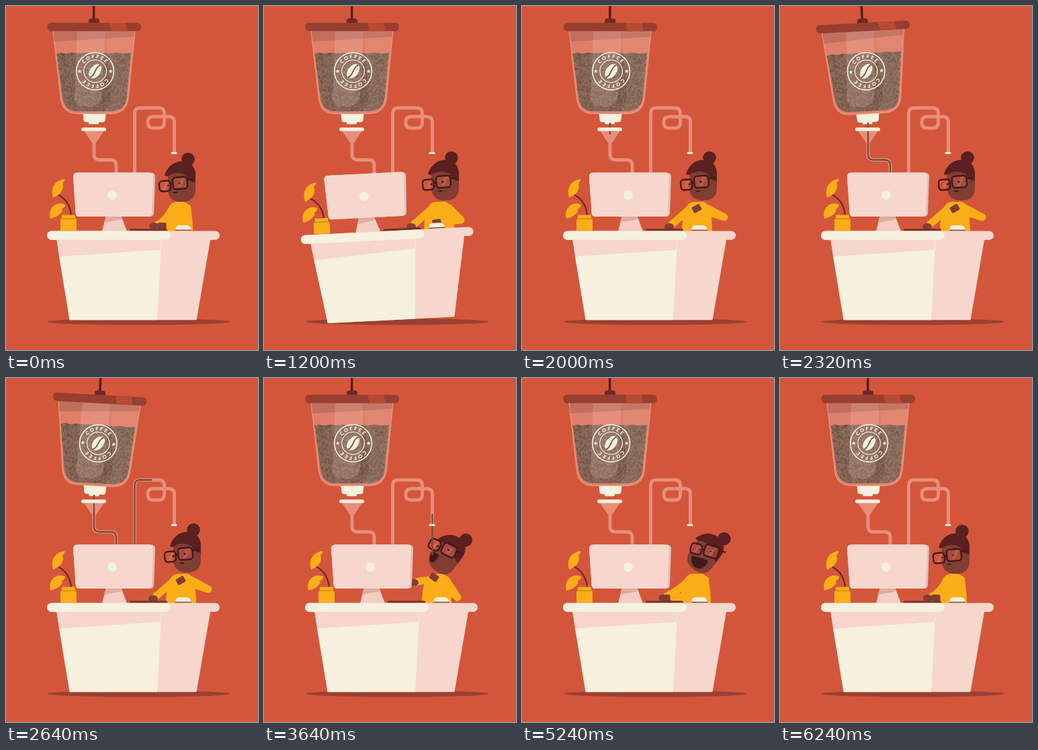
Write an HTML page that moves like this. It is 375 px wide and 513 px high and loops after 6.28 s.

```html
<!DOCTYPE html>
<html lang="en">
<head>
<meta charset="utf-8">
<title>Coffee break</title>
<style>
  html, body { margin: 0; width: 100%; height: 100%; overflow: hidden; background: #d4563a; }
  svg { display: block; width: 375px; height: 513px; }
  .line { fill: none; stroke-linecap: round; stroke-linejoin: round; }
  .cream { fill: #f6f0de; }
  .pink { fill: #f7d6cd; }
  .gold { fill: #fbad18; }
  .hair { fill: #5a2120; }
  .skin { fill: #813e33; }
  .frame { fill: #c655458c; stroke: #421a1b; stroke-width: 2.4; }
  text { font: 900 7.4px Lato, sans-serif; letter-spacing: 1.9px; text-anchor: middle; fill: #f6f0de; }
</style>
</head>
<body>
<svg viewBox="0 0 375 513">
  <defs>
    <clipPath id="fill"><path d="M75.5 71L82 69.5 90 71 99 69.5 108 70.5 118 69.5 130 71 142 69.5 153 71 164 69.5 175 71 186 70L179.5 136Q177 157 155 157H107Q87 157 84 136Z"/></clipPath>
    <path id="arc" d="M-19.6 0A19.6 19.6 0 0 1 19.6 0"/>
    <path id="star" d="M0-3.2L.9-1 3.1-1 1.4.5 2 2.8 0 1.5-2 2.8-1.4.5-3.1-1-.9-1Z"/>
  </defs>
  <rect width="375" height="513" fill="#d4563a"/>
  <ellipse cx="198" cy="470.8" rx="136" ry="4.8" fill="#9a4032"/>

  <g class="line" stroke="#e58f7b" stroke-width="4.9">
    <path d="M131 200V222Q131 229.5 139 229.5H156Q164 229.5 164 238V256"/>
    <path d="M191.5 256V160Q191.5 152 199.5 152H227Q235.5 152 235.5 160V174Q235.5 182 227 182H219Q211 182 211 174V173Q211 165 219 165H242Q250.5 165 250.5 173V218"/>
  </g>
  <path d="M116 186H146L134 204H128Z" fill="#e58f7b"/>

  <g id="hopper">
    <path d="M130.7-30V20" stroke="#4f1e1d" stroke-width="3.4"/>
    <path d="M70 37H192L182 138Q179 160.5 156 160.5H106Q84 160.5 81.5 138Z" fill="#f6d5cd" fill-opacity=".32" stroke="#eba896" stroke-width="1.4" stroke-opacity=".7"/>
    <path d="M70.5 37H191.5L190.5 46L72 53Z" fill="#7b4a40" opacity=".3"/>
    <g clip-path="url(#fill)">
      <rect x="70" y="66" width="122" height="96" fill="#8a6b5a"/>
      <path id="beans" fill="none" stroke="#6b4f44" stroke-width=".8"/>
    </g>
    <path d="M106 38H148L143 130Q141 150 122 150H117Q102 150 102 135Z" fill="#f9ddd5" opacity=".17"/>
    <path d="M148 38H191L182 138Q179 160 156 160H142Q154 152 156 130Z" fill="#f9ddd5" opacity=".07"/>
    <path d="M123 26V22Q123 18.5 127 18.5H135Q139 18.5 139 22V26Z" fill="#702a24"/>
    <rect x="61.5" y="25" width="139.5" height="12.5" rx="5.5" fill="#973f30"/>
    <path d="M154 25H178L181 37.5H157Z" fill="#b84a32"/>
    <g transform="translate(132.6 97.3)">
      <circle r="27.8" fill="none" stroke="#f6f0de" stroke-width="1.6"/>
      <circle r="16.8" fill="none" stroke="#f6f0de" stroke-width="1.2"/>
      <text><textPath href="#arc" startOffset="50%">COFFEE</textPath></text>
      <text transform="rotate(180)"><textPath href="#arc" startOffset="50%">COFFEE</textPath></text>
      <use href="#star" x="-23" class="cream"/><use href="#star" x="23" class="cream"/>
      <g transform="rotate(36)">
        <ellipse rx="7.8" ry="12" class="cream"/>
        <path d="M1-12C-5-4 5 4-1 12" fill="none" stroke="#6f5248" stroke-width="1.8"/>
      </g>
    </g>
    <path d="M114.5 161H148.5L147.5 170Q147 173.3 143.5 173.3H119.5Q116 173.3 115.5 170Z" class="cream"/>
    <rect x="123" y="172.5" width="15" height="3.7" rx="1.2" class="cream"/>
  </g>

  <g id="person">
    <path id="torso" class="gold"/>
    <path id="armL" class="line" stroke="#fbad18" stroke-width="11"/>
    <path id="armR" class="line" stroke="#fbad18" stroke-width="11"/>
    <rect id="handR" class="skin" x="-6.5" y="-5" width="13" height="10" rx="2"/>
    <ellipse id="handL" class="skin" rx="7" ry="5"/>
    <g id="head">
      <circle cx="9" cy="-36.5" r="9.8" class="hair"/>
      <path d="M-21-18V8Q-21 27 0 27Q20 27 20 8V-18Z" class="skin"/>
      <path d="M-26-13Q-19-32-2-33.5Q20-33 20-12V-2Q10-2 6-13Q-8-19-18-13Q-24-9-26-13Z" class="hair"/>
      <path id="mouth" fill="#42191b"/>
      <g id="glasses">
        <g class="frame">
          <rect x="-34" y="-6.5" width="16.5" height="15.5" rx="4.5"/>
          <rect x="-13.7" y="-10" width="21.5" height="17.5" rx="4.5"/>
          <path d="M-17.5-.5L-13.7-1M7.8-5L18-6"/>
        </g>
        <path d="M-29 7L-24-4H-20L-25 7ZM-7 5L-1-8H4L-2 5Z" fill="#f0a696" opacity=".2"/>
        <ellipse id="eyeL" cx="-21" cy="1" rx="1.6" fill="#42191b"/>
        <ellipse id="eyeR" cx="-4" cy="-1" rx="1.6" fill="#42191b"/>
      </g>
    </g>
  </g>

  <path id="coffee" fill="none" stroke="#7a4a3f" stroke-width="2.3"
    d="M131 174V222Q131 229.5 139 229.5H156Q164 229.5 164 238V270H191.5V160Q191.5 152 199.5 152H227Q235.5 152 235.5 160V174Q235.5 182 227 182H219Q211 182 211 174V173Q211 165 219 165H242Q250.5 165 250.5 173V264"/>
  <rect x="112" y="181.2" width="37" height="5.4" rx="2.7" class="cream"/>
  <rect x="245.5" y="217.8" width="9" height="3" rx="1.5" class="cream"/>

  <g id="desk">
    <path d="M97 314Q96 291 77 281" class="line" stroke="#6f2a24" stroke-width="2.2"/>
    <path d="M70 286C66 270 73 260 87.5 258C88 262 82 264 85 268C85 278 78 282 70 286ZM66 317C62 302 74 290 88 296C88 302 80 302 84 305C80 312 74 315 66 317Z" class="gold"/>
    <rect x="83" y="311.5" width="20" height="7" rx="1.5" class="gold"/>
    <path d="M81 320Q81 317 84 317H102Q105 317 105 320V335H81Z" class="gold"/>
    <path d="M83 317.3H103" stroke="#cf8618" stroke-width="1.4"/>
    <path d="M149 312H171L180 336H143Z" fill="#f4cdc4"/>
    <path d="M149 313H171L173 318L147 323Z" fill="#dfaca1"/>
    <path id="screen" d="M106 248.5H213Q219 248.5 219 254.5L217 309Q216.8 314 211 314H109Q104 314 103.7 309L100 254.5Q100 248.5 106 248.5Z" class="pink"/>
    <use href="#screen" x="3" style="filter:brightness(.9)"/>
    <use href="#screen"/>
    <circle cx="158" cy="282" r="7" class="cream"/>
    <rect x="184" y="332.3" width="56" height="4" rx="2" fill="#7a2f28"/>
    <path d="M252 335Q252 327 258 327H269Q275 327 276 335Z" class="cream"/>
    <path d="M252 334.3H276" stroke="#7a2f28" stroke-width="1.2"/>
    <path d="M75 346H304.5L283.5 468.3H94.7Z" class="pink"/>
    <path d="M75 346H231.5L225 468.3H94.7L79 373.5L229.7 363.5Z" class="cream"/>
    <path d="M75.4 349H231L229.7 363.5L79 373.5Z" class="pink"/>
    <rect x="61" y="335.5" width="257" height="13.3" rx="6.6" class="pink"/>
    <rect x="61" y="335.5" width="184" height="13.3" rx="6.6" class="cream"/>
  </g>
</svg>
<script>
const LOOP = 6280;
const $ = id => document.getElementById(id);
const set = (id, attrs) => { for (const k in attrs) $(id).setAttribute(k, attrs[k]); };
const clamp = x => Math.max(0, Math.min(1, x));
const ease = x => x * x * (3 - 2 * x);
const wave = (t, zero, period) => Math.sin((t - zero) / period * 2 * Math.PI);

// Head, glasses (offset, angle), mouth, torso sides, left arm (bend, hand), right arm (elbow, hand)
const typing = {
  hx: 262, hy: 265, rot: 0, gx: 0, gy: 0, gr: -5, mx: -10, my: 13, mw: 4, mh: 1.2, eye: .8,
  left: 236, right: 278, bx: 236, by: 322, lx: 220, ly: 328,
  ex: 271, ey: 324, rx: 232, ry: 328, turn: 0
};
const sulking = {
  ...typing, hx: 270, hy: 263, mx: -8, eye: 1.5,
  left: 238, right: 283, bx: 233, by: 317, lx: 219, ly: 329,
  ex: 301, ey: 315, rx: 260, ry: 302, turn: -30
};
const pounding = { ...sulking, ex: 293, ey: 319, rx: 257, ry: 323, turn: -8 };
const drinking = {
  ...sulking, hx: 271.5, hy: 266, rot: 36, gx: 1, gy: -9, gr: -9, mx: -16, my: 6, mw: 6.5, mh: 15, eye: 1.2,
  left: 235, right: 279, bx: 238, by: 301, lx: 223, ly: 305,
  ex: 288, ey: 327, rx: 253, ry: 297, turn: 35
};
const happy = {
  ...typing, hx: 272, hy: 264, rot: 36, gx: 8, gy: -10, gr: -20, mx: -3, my: 8, mw: 12.5, mh: 16, eye: .7,
  right: 281, bx: 233, by: 317, lx: 210, ly: 328, rx: 214, ry: 328
};
const poses = [
  [0, typing], [480, typing], [1060, sulking], [1120, sulking], [1190, pounding], [1280, pounding],
  [1600, sulking], [2680, sulking], [3020, drinking], [3680, drinking], [4260, happy],
  [5600, happy], [6250, typing], [LOOP, typing]
];

function track(keys, t, mix) {
  const i = Math.max(1, keys.findIndex(k => k[0] > t));
  const [t0, a] = keys[i - 1], [t1, b] = keys[i];
  return mix(a, b, clamp((t - t0) / (t1 - t0)));
}
const lerp = (a, b, x) => a + (b - a) * x;
const blend = (a, b, x) => {
  const p = {};
  for (const k in a) p[k] = lerp(a[k], b[k], ease(x));
  return p;
};

let seed = 7;
const rnd = () => (seed = seed * 16807 % 2147483647) / 2147483647;
let beans = "";
for (let i = 0; i < 1100; i++) {
  const x = 74 + rnd() * 114, y = 69 + rnd() * 90, a = rnd() * 6.3;
  const dx = 1.9 * Math.cos(a), dy = 1.9 * Math.sin(a);
  beans += `M${x - dx} ${y - dy}q${dx - dy} ${dy + dx} ${2 * dx} ${2 * dy}`;
}
set("beans", { d: beans });

const flow = $("coffee").getTotalLength();
const fronts = [[0, 0], [1960, 0], [2640, 290], [3040, flow], [LOOP, flow]];
const tails = [[0, 0], [3030, 0], [3640, flow - 64], [3720, flow], [LOOP, flow]];

function drawPerson(t) {
  const p = track(poses, t, blend);
  if (t > 40 && t < 320) p.eye += 1.4 * Math.sin((t - 40) / 280 * Math.PI);
  const joy = ease(clamp((t - 4200) / 200)) * ease(clamp((5700 - t) / 200));
  p.hy += joy * 2 * wave(t, 5240, 400);
  p.rot += joy * 2.5 * wave(t, 5240, 400);
  p.lx += joy * 3 * wave(t, 5240, 240);
  p.ly -= joy * 2 * Math.abs(wave(t, 5240, 240));

  set("torso", { d: `M${p.left} 338Q${p.left} 292 ${p.left + 18} 292H${p.right - 13}Q${p.right} 294 ${p.right} 338Z` });
  const dx = p.lx - p.bx, dy = p.ly - p.by, reach = Math.hypot(dx, dy) || 1;
  set("armL", { d: `M${p.left + 12} 302Q${p.bx} ${p.by} ${p.lx - dx / reach * 6} ${p.ly - dy / reach * 6}` });
  set("handL", { cx: p.lx, cy: p.ly });
  set("armR", { d: `M${p.right - 8} 301L${p.ex} ${p.ey}L${lerp(p.ex, p.rx, .8)} ${lerp(p.ey, p.ry, .8)}` });
  set("handR", { transform: `translate(${p.rx} ${p.ry}) rotate(${p.turn})` });
  set("head", { transform: `translate(${p.hx} ${p.hy}) rotate(${p.rot})` });
  set("glasses", { transform: `translate(${p.gx} ${p.gy}) rotate(${p.gr})` });
  set("mouth", {
    transform: `translate(${p.mx} ${p.my}) rotate(${p.gr})`,
    d: `M${-p.mw} 0Q0 -2 ${p.mw} 0C${p.mw} ${p.mh * 1.3} ${-p.mw} ${p.mh * 1.3} ${-p.mw} 0Z`
  });
  set("eyeL", { ry: p.eye });
  set("eyeR", { ry: p.eye });
}

function draw(t) {
  drawPerson(t);
  const tilt = track([[0, 0], [1130, 0], [1240, -4], [1460, .3], [1640, 0], [LOOP, 0]], t,
    (a, b, x) => lerp(a, b, ease(x)));
  set("desk", { transform: `rotate(${tilt} 189 468)` });

  const swinging = t > 1488 && t < 3024;
  const swing = swinging ? Math.min(5.4, 5.5 - (t - 1872) * .003) * wave(t, 2000, 512) : 0;
  set("hopper", { transform: `rotate(${swing} 131 182)` });

  const front = track(fronts, t, lerp), tail = track(tails, t, lerp);
  set("coffee", {
    visibility: front - tail > .5 ? "visible" : "hidden",
    "stroke-dasharray": `0 ${tail} ${front - tail} ${flow}`
  });
}

function tick() {
  draw(performance.now() % LOOP);
  requestAnimationFrame(tick);
}
tick();
</script>
</body>
</html>
```
